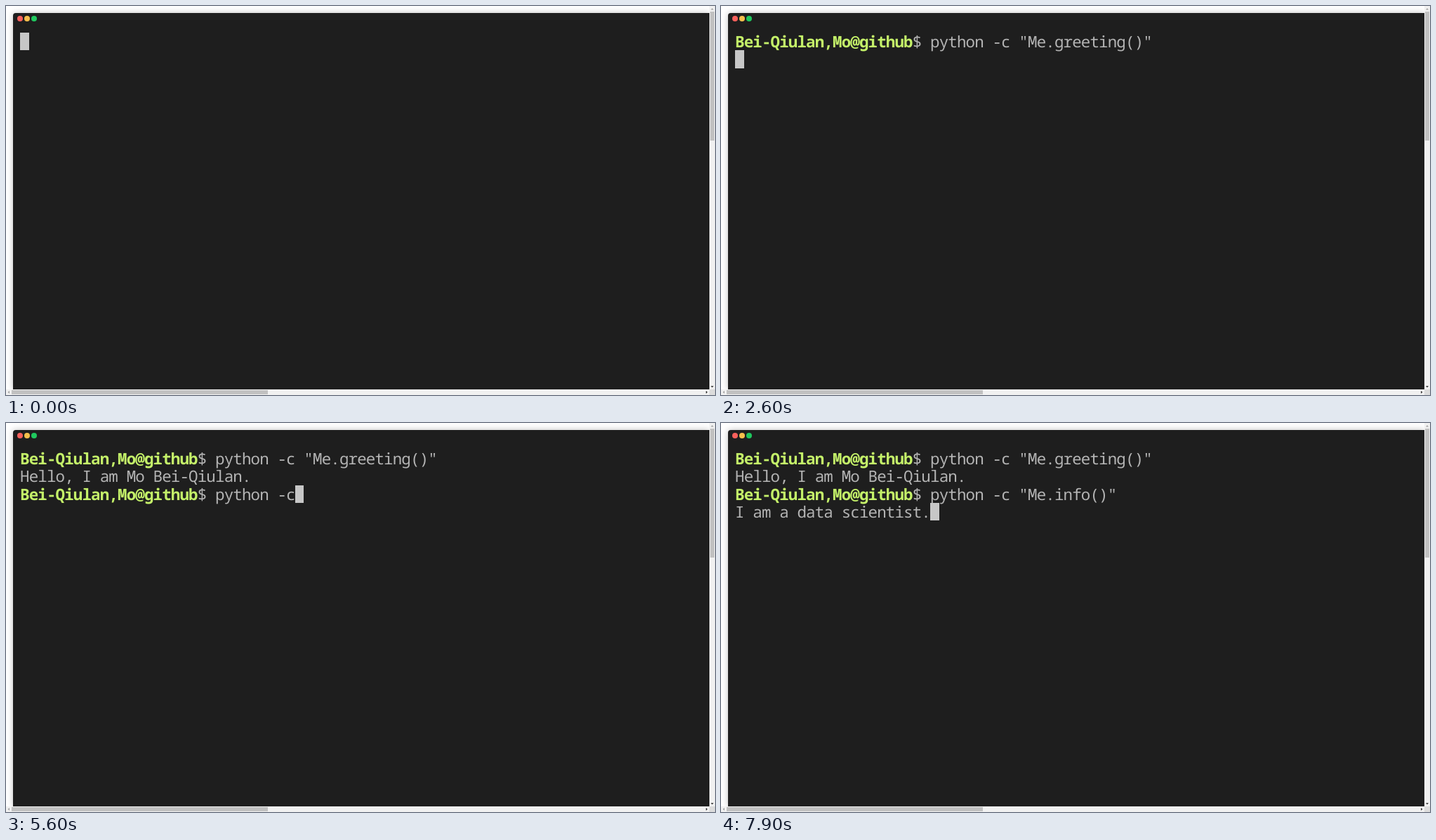
These frames come from a looping animation (1010 px wide and 555 px high, 8000 ms). An HTML page:

```html
<!DOCTYPE html>
<html lang="en">
<head>
<meta charset="utf-8">
<style>
  html, body { margin: 0; width: 100%; height: 100%; overflow: hidden; background: #fff; }
  .page { position: absolute; inset: 0 8px 8px 0; overflow: hidden; }
  .window {
    position: absolute; inset: 9.5px 0 0 9.5px;
    border-radius: 4px 0 0 0; background: #1e1e1e; box-shadow: 0 0 10px rgba(0, 0, 0, .25);
  }
  pre {
    position: absolute; left: 20px; top: 38px; margin: 0; color: #b4b4b4;
    font: 22.5px/25.27px "Noto Sans Mono", monospace;
    letter-spacing: calc(12.636px - 1ch);
    text-rendering: geometricPrecision; font-variant-ligatures: none;
  }
  pre b { color: #c4f169; font-weight: 600; }
  pre i { display: inline-block; width: 12.636px; height: 25.27px; vertical-align: top; background: #c7c7c7; }
  svg { position: absolute; left: 0; top: 0; display: block; }
</style>
</head>
<body>
<div class="page">
  <div class="window"></div>
  <pre id="screen"></pre>
</div>
<svg width="1010" height="555">
  <circle cx="20" cy="18" r="4" fill="#fa605c"/>
  <circle cx="30" cy="18" r="4" fill="#f7bf4c"/>
  <circle cx="40" cy="18" r="4" fill="#1fc85e"/>
  <path d="M1002 0h8v547h-8zM0 547h1002v8H0z" fill="#f1f1f1"/>
  <path d="M1002 547h8v8h-8z" fill="#dcdcdc"/>
  <path d="M1003 8h6v184h-6zM8 548h365v6H8z" fill="#c1c1c1"/>
  <path d="M1004 5.5h4l-2-2.5zM5 549v4l-2.5-2z" fill="#a3a3a3"/>
  <path d="M1004 542h4l-2 2.5zM997 549v4l2.5-2z" fill="#404040"/>
</svg>
<script>
const LOOP = 8000, TICK = 100;
const terminal = document.getElementById('screen');
const shellPrompt = '<b>Bei-Qiulan,Mo@github</b>$ ';
const greeting = 'python -c "Me.greeting()"';
const info = 'python -c "Me.info()"';

// One key per tick, but the screen refreshes only at these key counts.
const greetingStops = [1, 3, 5, 6, 8, 9, 10, 11, 13, 15, 17, 19, 20, 21, 23, 25];
const infoStops = [0, 2, 4, 5, 7, 9, 10, 11, 13, 14, 16, 17, 18, 20, 21];

function typed(command, stops, elapsed) {
  const shown = stops.filter(n => n * TICK <= elapsed).pop() || 0;
  return shellPrompt + command.slice(0, shown);
}

function content(t) {
  if (t < 100) return '';
  let text = typed(greeting, greetingStops, t);
  if (t >= 2600) text += '\n';
  if (t >= 3700) text += 'Hello, I am Mo Bei-Qiulan.';
  if (t >= 4700) text += '\n' + typed(info, infoStops, t - 4700);
  if (t >= 7900) text += '\nI am a data scientist.';
  return text;
}

let last = null;
function draw() {
  const text = content(performance.now() % LOOP);
  if (text !== last) terminal.innerHTML = (last = text) + '<i></i>';
  requestAnimationFrame(draw);
}
draw();
</script>
</body>
</html>
```
